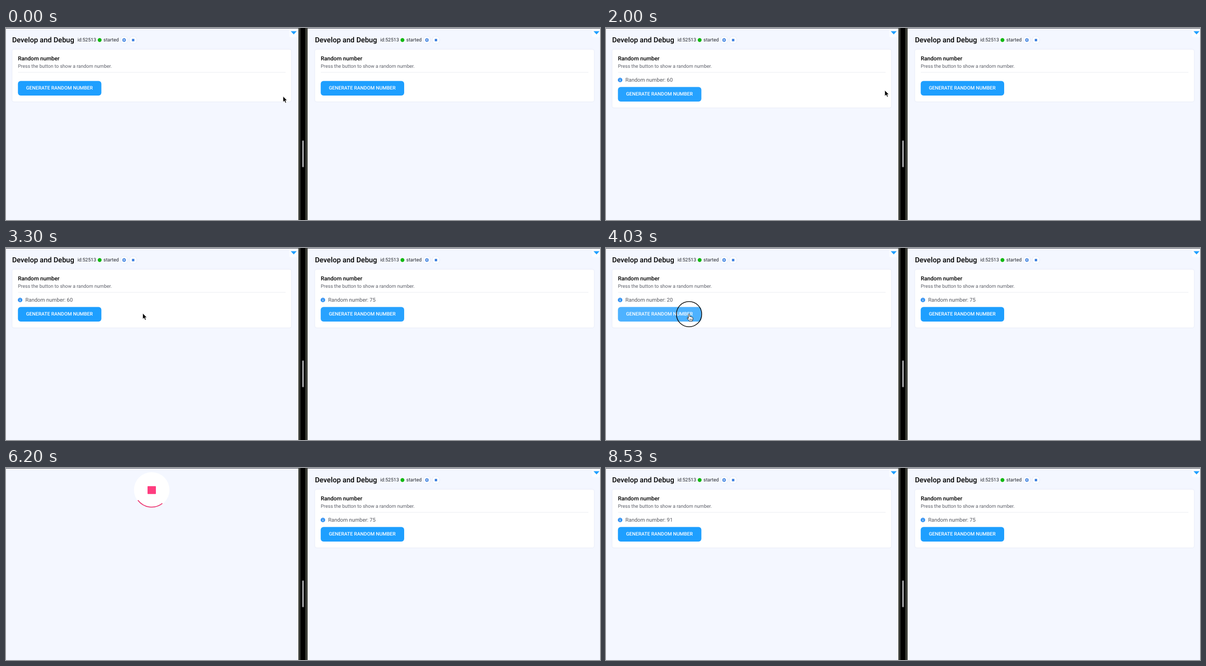
These frames come from a looping animation (1280 by 415 pixels, 8.67 s). An HTML page:

```html
<!DOCTYPE html>
<html lang="en">
<head>
<meta charset="utf-8">
<title>Develop and Debug</title>
<style>
  html, body { margin: 0; width: 100%; height: 100%; overflow: hidden; background: #f4f7ff; }
  svg { display: block; width: 100%; height: 100%; }
  text { font-family: Roboto, Arial, sans-serif; font-size: 10.45px; text-rendering: geometricPrecision; fill: #222529; }
  .title { font-size: 15.5px; font-weight: 500; fill: #000; }
  .label { font-size: 12.1px; font-weight: 500; fill: #000; }
  .hint { fill: #5b5e68; }
  .result { font-size: 11.35px; fill: #55575e; }
  .caption { font-size: 10.5px; font-weight: 500; fill: #fff; }
  .card { fill: #fff; filter: drop-shadow(0 .5px 1px rgba(60, 80, 130, .14)); }
  .chip { fill: #fff; filter: drop-shadow(0 0 1px rgba(60, 80, 130, .16)); }
</style>
</head>
<body>
<svg viewBox="0 0 1280 415" preserveAspectRatio="none">
  <rect width="1280" height="415" fill="#f4f7ff"/>
  <g id="panels"></g>
  <rect width="1280" height="1" fill="#30323b"/>
  <rect x="630" width="20" height="415" fill="#3b3d37"/>
  <rect x="634.5" width="10.5" height="415" fill="#000"/>
  <rect x="638" y="243" width="4" height="58" rx="2" fill="#97979a"/>
  <circle id="ring" r="27.3" fill="none" stroke="#0b0b0b" stroke-width="1.6"/>
  <g id="cursor">
    <path id="arrow" d="M0 -.5V12.2L2.9 9.5 5 14.2 7.2 13.2 5.2 8.7H9Z" fill="#000" stroke="#fff" stroke-width=".9" stroke-linejoin="round"/>
    <g id="hand" stroke="#111" stroke-width="1" stroke-linejoin="round" stroke-linecap="round">
      <path d="M-1.4 9.2V1.1C-1.4 -.9 1.4 -.9 1.4 1.1V5.5C2.2 4.5 3.8 4.8 3.9 6.1 4.8 5.3 6.2 5.7 6.3 7 7.3 6.5 8.3 7.2 8.3 8.4V11C8.2 12.6 7.2 13.2 7 15H.2C0 13.6-1.5 12.7-2.3 11.2L-3.9 8.9C-4.5 7.7-3 6.7-2.2 7.9Z" fill="#fff"/>
      <path d="M1.6 10.2V12.7M3.7 10.2V12.7M5.8 10.2V12.7" stroke-width=".8"/>
    </g>
  </g>
</svg>
<script>
const LOOP = 8670;
const $ = id => document.getElementById(id);
const clamp = v => Math.min(1, Math.max(0, v));
const within = (t, [a, b]) => t >= a && t < b;
const show = (el, on) => el.setAttribute('display', on ? 'inline' : 'none');
const shift = (el, x, y) => el.setAttribute('transform', `translate(${x} ${y})`);

// Times in ms: numbers are [start, value], the rest [start, end].
const panels = [
  {
    x: 0,
    numbers: [[1540, 60], [3790, 20], [4190, 91]],
    hovers: [[1160, 1668], [3404, 4560]],
    away: [5100, 6600], spin: 5180, frozen: [5870, 6200]
  },
  {
    x: 652.5,
    numbers: [[2430, 14], [2850, 75]],
    hovers: [[2086, 2974]],
    away: [7330, 8330], spin: 7500, frozen: [7800, 8170]
  }
];
const clicks = [[1340, 1490], [2270, 2400], [2690, 2820], [3610, 3740], [4030, 4150]];

// Cursor legs: start, end, target x, target y.
const home = [597, 148];
const legs = [
  [30, 1390, 170, 128],
  [1580, 2180, 718, 137],
  [2400, 2520, 719.5, 136.5],
  [2880, 3480, 179, 143],
  [4530, 4700, 146, -20]
];

const tooth = a => `<rect x="-1" y="-4.2" width="2" height="2.4" rx=".4" transform="rotate(${a})"/>`;

const panelMarkup = `
  <g data-k="page">
    <path d="M610 0H630V20H614Q610 20 610 16Z" fill="#fafcff"/>
    <path d="M614.3 7.3H625.7L620 13.4Z" fill="#1e9fff" stroke="#1e9fff" stroke-width=".8" stroke-linejoin="round"/>
    <text class="title" x="13.2" y="31.2">Develop and Debug</text>
    <text x="154" y="29.4">id:52513</text>
    <circle cx="201.8" cy="26" r="4.2" fill="#10b910"/>
    <text x="210" y="29.4">started</text>
    <circle class="chip" cx="254.5" cy="26" r="7.5"/>
    <g transform="translate(254.5 26)" fill="#3b7fe0">
      <circle r="2.3" fill="none" stroke="#3b7fe0" stroke-width="1.7"/>${[0, 60, 120, 180, 240, 300].map(tooth).join('')}
    </g>
    <circle class="chip" cx="274" cy="26" r="7.5"/>
    <rect x="271.4" y="23.5" width="5.2" height="5.2" fill="#3b7fe0"/>
    <rect class="card" data-k="card" x="13.5" y="46.5" width="601" height="112.5" rx="4"/>
    <text class="label" x="25.7" y="69.6">Random number</text>
    <text class="hint" x="25.7" y="86.4">Press the button to show a random number.</text>
    <rect x="26" y="95.4" width="576.5" height="1" fill="#e9ebf0"/>
    <g data-k="info">
      <circle cx="30.4" cy="112.4" r="4.9" fill="#3794f2"/>
      <path d="M30.4 111.8V115M30.4 109.6V110.6" stroke="#fff" stroke-width="1.1"/>
      <text class="result" data-k="result" x="41.8" y="116.4"></text>
    </g>
    <g data-k="button">
      <rect data-k="face" x="25.7" y="114.5" width="179.8" height="31.5" rx="6"/>
      <text class="caption" x="43.2" y="133.4">GENERATE RANDOM NUMBER</text>
    </g>
  </g>
  <g data-k="loader" transform="translate(314 47.3)">
    <circle r="38.3" fill="#fff"/>
    <rect x="-9" y="-8" width="18" height="17" rx="1" fill="#ff3d7f"/>
    <path data-k="arc" d="M-26.6 26A37.2 37.2 0 0 0 26.6 26" fill="none" stroke="#ec3f78" stroke-width="2"/>
  </g>`;

for (const p of panels) {
  const g = document.createElementNS('http://www.w3.org/2000/svg', 'g');
  shift(g, p.x, 0);
  g.innerHTML = panelMarkup;
  $('panels').append(g);
  p.el = {};
  g.querySelectorAll('[data-k]').forEach(e => p.el[e.dataset.k] = e);
}

function drawPanel({ el, numbers, hovers, away, spin, frozen }, t) {
  const gone = within(t, away);
  show(el.page, !gone);
  show(el.loader, gone && t >= spin);
  const turnTime = within(t, frozen) ? frozen[0] : t;
  el.arc.setAttribute('transform', `rotate(${(turnTime - spin) * 0.36})`);

  const latest = numbers.filter(n => t >= n[0]).pop();
  show(el.info, latest);
  el.result.textContent = latest ? `Random number: ${latest[1]}` : '';
  el.card.setAttribute('height', latest ? 125.5 : 112.5);
  shift(el.button, 0, latest ? 13 : 0);

  const glow = hovers.reduce((s, [a, b]) => s + clamp((t - a) / 400) - clamp((t - b) / 400), 0);
  const mix = (c, k) => Math.round(c + (k - c) * glow);
  el.face.setAttribute('fill', `rgb(${mix(30, 78)},${mix(159, 178)},255)`);
}

function cursorAt(t) {
  let [x, y] = home;
  for (const [a, b, toX, toY] of legs) {
    const u = clamp((t - a) / (b - a));
    const s = u * u * (3 - 2 * u);
    x += (toX - x) * s;
    y += (toY - y) * s;
  }
  return [x, y];
}

function draw(t) {
  panels.forEach(p => drawPanel(p, t));
  const [x, y] = cursorAt(t);
  const over = panels.some(p => p.hovers.some(h => within(t, h)));
  shift($('cursor'), x, y);
  shift($('ring'), x, y);
  show($('cursor'), t < 4700);
  show($('hand'), over);
  show($('arrow'), !over);
  show($('ring'), clicks.some(c => within(t, c)));
}

const start = performance.now();
function tick() {
  draw((performance.now() - start) % LOOP);
  requestAnimationFrame(tick);
}
tick();
</script>
</body>
</html>
```
